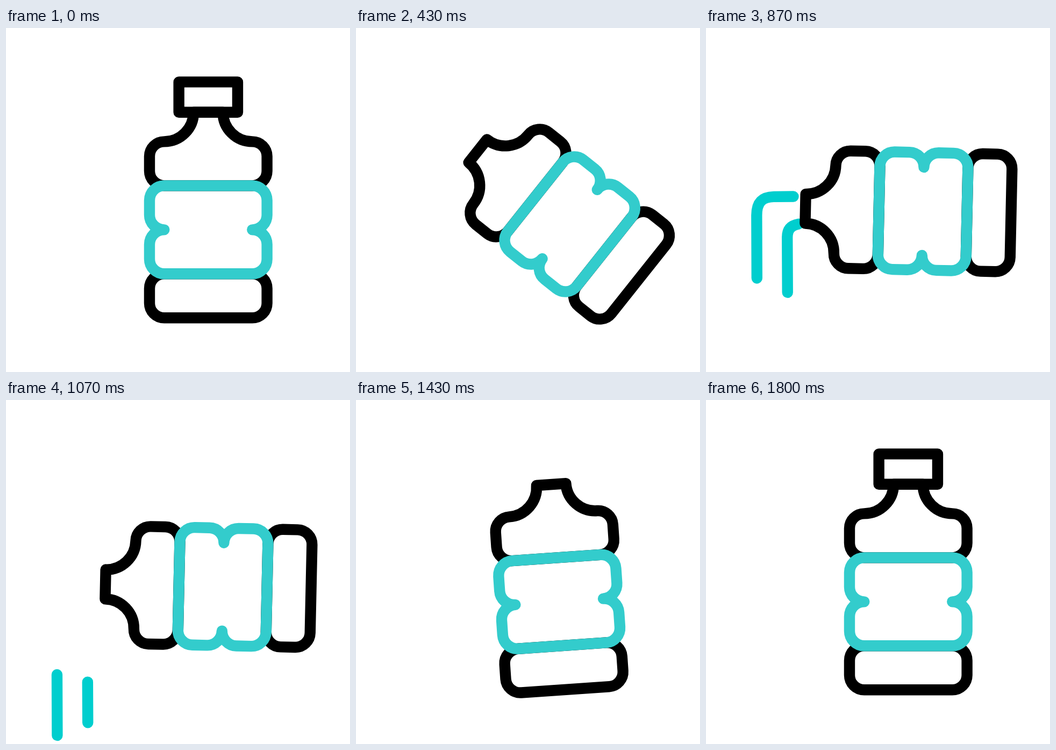
Animation of 640 by 640 pixels, one loop 2000 ms. Source, as an HTML page with a canvas:

```html
<!DOCTYPE html>
<html lang="en">
<head>
<meta charset="utf-8">
<title>Pouring bottle</title>
<style>
html, body { margin: 0; width: 100%; height: 100%; overflow: hidden; background: #fff; }
canvas { display: block; width: 640px; height: 640px; }
</style>
</head>
<body>
<canvas id="stage" width="640" height="640"></canvas>
<script>
const ctx = document.getElementById('stage').getContext('2d');

const LOOP = 2000, FPS = 30;
const UNIT = 27.33, LINE = 20.4;
const CX = 376.3, CY = 348;
const POUR = 88.75;
const BLACK = '#000', TEAL = '#33cccc', WATER = '#00cece';

// Bottle parts in units, with the bottle's middle at the origin
const top_ = new Path2D('M-1-7A2 2 0 0 1-3-5A1 1 0 0 0-4-4V-3A1 1 0 0 0-3-2H3A1 1 0 0 0 4-3V-4A1 1 0 0 0 3-5A2 2 0 0 1 1-7Z');
const label = new Path2D('M-3 1A1 1 0 0 1-4 0V-1A1 1 0 0 1-3-2H3A1 1 0 0 1 4-1V0A1 1 0 0 1 3 1A1 1 0 0 1 4 2V3A1 1 0 0 1 3 4H-3A1 1 0 0 1-4 3V2A1 1 0 0 1-3 1');
const base = new Path2D('M-3 4H3A1 1 0 0 1 4 5V6A1 1 0 0 1 3 7H-3A1 1 0 0 1-4 6V5A1 1 0 0 1-3 4Z');
const cap = new Path2D('M-2-1.03H2V1.03H-2Z');

// Water in pixels, as it lies while the bottle is fully tipped
const streams = [
  { path: new Path2D('M183 321L126 321.5C104 322 94.3 332 94.3 356L95.9 760'), len: 380 },
  { path: new Path2D('M186 371.5C163 371 151.2 378 151.2 397L153 760'), len: 254 }
];

const rad = deg => deg * Math.PI / 180;
const clamp = (v, lo, hi) => Math.min(hi, Math.max(lo, v));
function ease(f, from, to) {
  const p = clamp((f - from) / (to - from), 0, 1);
  return p * p * (3 - 2 * p);
}

function tilt(f) {
  return POUR * (ease(f, 6.8, 18) - ease(f, 33.4, 44.4));
}

function lift(f) {
  const half = 3.5, start = 18.25;
  if (f <= start || f >= start + 4 * half) return 0;
  const k = (f - start) / half % 2;
  return -64.5 * ease(k < 1 ? k : 2 - k, 0, 1);
}

function place(x, y, deg, scale, draw) {
  ctx.save();
  ctx.translate(x, y);
  ctx.rotate(rad(deg));
  ctx.scale(scale, scale);
  ctx.lineWidth = LINE / scale;
  draw();
  ctx.restore();
}

function stroke(path, color) {
  ctx.strokeStyle = color;
  ctx.stroke(path);
}

function drawWater(f, angle, dy) {
  const head = clamp((f - 17) / 15, 0, 1.1);
  const tail = clamp((f - 25.5) * 0.108, 0, 1.1);
  if (head <= tail) return;
  place(CX, CY + dy, POUR - angle, 1, () => {
    ctx.translate(-CX, -CY);
    for (const { path, len } of streams) {
      ctx.setLineDash([(head - tail) * len, 2000]);
      ctx.lineDashOffset = -tail * len;
      stroke(path, WATER);
    }
  });
}

function drawCap(f) {
  const restY = CY - 8.03 * UNIT;
  let x = CX, y = restY, turn = 0;
  if (f < 30) {
    const p = ease(f, 0, 12);
    x += 340 * p;
    y -= 60 * (1 - (1 - 2.16 * p) ** 2);
    turn = 71 * p;
  } else {
    y -= 229 * (1 - ease(f, 44.4, 54));
  }
  place(x, y, turn, UNIT, () => stroke(cap, BLACK));
}

function render(f) {
  ctx.fillStyle = '#fff';
  ctx.fillRect(0, 0, 640, 640);
  ctx.lineCap = ctx.lineJoin = 'round';
  const angle = tilt(f), dy = lift(f);
  drawWater(f, angle, dy);
  place(CX, CY + dy, -angle, UNIT, () => {
    stroke(top_, BLACK);
    stroke(base, BLACK);
    stroke(label, TEAL);
  });
  drawCap(f);
}

const begin = performance.now();
function tick() {
  const t = (performance.now() - begin) % LOOP;
  // Stepped at 30 per second, with step times rounded to 10 ms
  render(Math.floor((t + 3.4) * FPS / 1000) % 60);
  requestAnimationFrame(tick);
}
tick();
</script>
</body>
</html>
```
